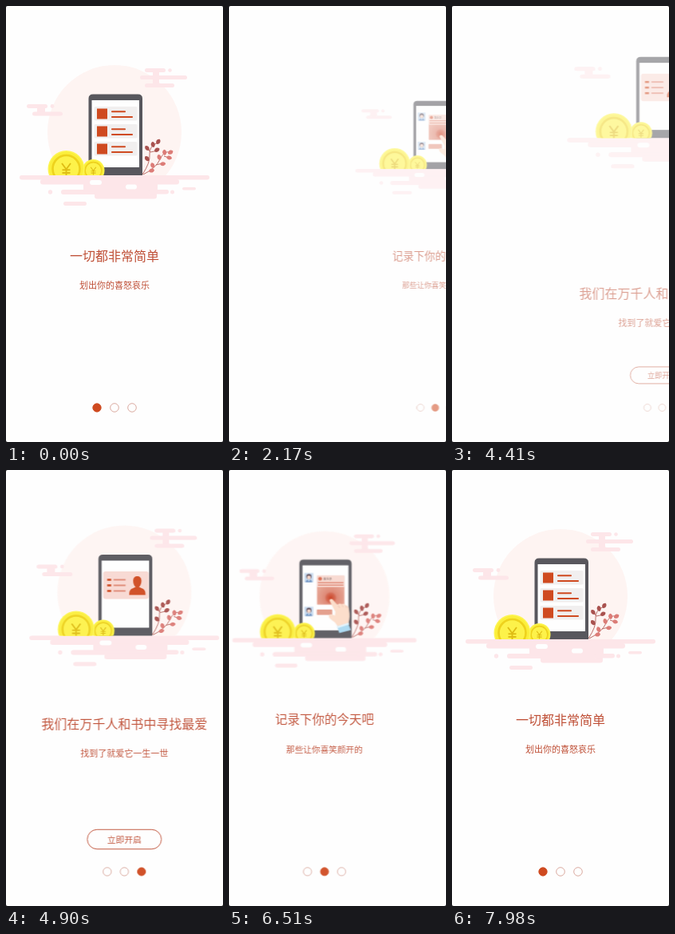
Recreate the animation shown at these times as an HTML page. Size 272 by 546 pixels, loop 8000 ms.

```html
<!DOCTYPE html>
<html lang="zh-CN">
<head>
<meta charset="utf-8">
<title>引导页</title>
<style>
@property --x { syntax: "<number>"; inherits: true; initial-value: 0; }

html, body { margin: 0; width: 100%; height: 100%; overflow: hidden; background: #222; }
svg {
  display: block; width: 100%; height: 100%;
  background: #fefefe; border-radius: 2px;
  --red: #cf4a20; --ink: #bf4f36; --pink: #fde6e9;
  animation: swipe 8s infinite;
}
text { font-family: "Noto Sans CJK SC", "Noto Sans CJK", "Noto Sans", sans-serif; text-anchor: middle; fill: var(--ink); }
.title { font-size: 16px; }
.sub { font-size: 11px; }

/* --x is the scroll position in pages; only the nearest page shows */
.page {
  --d: calc(var(--i) - var(--x));
  --p: max(var(--d), -1 * var(--d));
  --s: max(.84, 1 - .5 * var(--p));
  transform: translateX(calc(var(--d) * 272px));
  opacity: calc((1 - var(--p)) * clamp(0, (.5 - var(--p)) * 9999, 1));
}
.zoom { transform: scale(var(--s)); }
.up { transform: translateY(calc(var(--p) * -100px)); }
.down { transform: translateY(calc(var(--p) * 100px)); }
.halo { opacity: calc(1 - 2.3 * var(--p)); }
.art { transform-origin: 136px 162px; }
.title { transform-origin: 136px 313px; }
.sub { transform-origin: 136px 350px; }
.button { transform-origin: 136px 462px; }
.dots { transform-origin: 136px 503px; }

.dots circle { fill: none; stroke: #d7a297; stroke-width: .9; }
.dots .on { fill: var(--red); stroke: var(--red); }

@keyframes swipe {
  0%, 19.25% { --x: 0; animation-timing-function: cubic-bezier(.447, 0, .447, 1); }
  35.5%, 47.25% { --x: 1; animation-timing-function: cubic-bezier(.413, 0, .413, 1); }
  64.75%, 75.25% { --x: 2; animation-timing-function: cubic-bezier(.225, 0, .225, 1); }
  84%, 88.4% { --x: 1; animation-timing-function: cubic-bezier(.25, 0, .25, 1); }
  98.5%, 100% { --x: 0; }
}
</style>
</head>
<body>
<svg viewBox="0 0 272 546" preserveAspectRatio="none">
  <defs>
    <radialGradient id="press" gradientUnits="userSpaceOnUse" cx="144" cy="160" r="19">
      <stop offset="0" stop-color="#c93a1c"/>
      <stop offset=".3" stop-color="#d4624a"/>
      <stop offset=".42" stop-color="#dd8470"/>
      <stop offset="1" stop-color="#e6a08e"/>
    </radialGradient>
    <clipPath id="above"><rect width="272" height="212"/></clipPath>

    <g id="coin">
      <circle r="23" fill="#fdf553"/>
      <circle r="21.5" fill="#fbee3a"/>
      <circle r="17" fill="#fdf24a" stroke="#eed21d" stroke-width="2.6"/>
      <path d="M-5.5-7 0 .5 5.5-7M0 .5V9M-5 1.2H5M-5 5H5" fill="none" stroke="#dfbd14" stroke-width="1.9"/>
    </g>

    <path id="leaf" d="M0 0C-3.400-1.500-3.300-6 0-7.200C3.300-6 3.400-1.500 0 0Z"/>

    <g id="scene">
      <circle class="halo" cx="136" cy="158" r="84" fill="#fef4f2" clip-path="url(#above)"/>
      <g fill="var(--pink)">
        <rect x="174" y="78" width="26" height="5" rx="2.500"/>
        <circle cx="205.500" cy="80.500" r="2.300"/>
        <rect x="184" y="82" width="8" height="6"/>
        <rect x="168" y="87" width="59" height="5" rx="2.500"/>
        <rect x="184" y="91" width="8" height="7"/>
        <rect x="174" y="97" width="37" height="5" rx="2.500"/>

        <rect x="26" y="123" width="26" height="5" rx="2.500"/>
        <circle cx="58" cy="125.500" r="2.400"/>
        <rect x="39" y="127" width="10" height="7"/>
        <rect x="33" y="132.500" width="38" height="5" rx="2.500"/>

        <rect x="17" y="212" width="238" height="5.500" rx="2.700"/>
        <rect x="43" y="217" width="174" height="6.500" rx="3"/>
        <rect x="97" y="222" width="93" height="9"/>
        <rect x="69" y="230" width="121" height="6" rx="3"/>
        <rect x="111" y="234" width="78" height="7.500" rx="3"/>
        <rect x="72" y="245" width="29" height="5" rx="2.500"/>
        <rect x="221" y="227" width="17" height="3.500" rx="1.700"/>
        <rect x="178" y="230" width="26" height="5.500" rx="2.700"/>
        <circle cx="55.500" cy="233" r="2.700"/>
        <circle cx="208.500" cy="233" r="2.500"/>
      </g>
      <g fill="#fefefe">
        <rect x="105" y="218" width="15" height="6" rx="3"/>
        <rect x="150" y="223.500" width="14" height="6" rx="3"/>
      </g>

      <g fill="none" stroke="#b3605b" stroke-width=".9">
        <path d="M171 211Q181 196 180 186T190 171"/>
        <path d="M172 211Q188 203 193 192T206 183"/>
        <path d="M181 183 178 179M181 183 190 181M180 193 176 189M193 192 192 187M188 199 196 197M198 188 204 190"/>
      </g>
      <g fill="#a9524f">
        <use href="#leaf" transform="translate(189 173) rotate(30)"/>
        <use href="#leaf" transform="translate(185 177) rotate(-12)"/>
        <use href="#leaf" transform="translate(179 181) rotate(-35)"/>
        <use href="#leaf" transform="translate(186 182) rotate(62)"/>
        <use href="#leaf" transform="translate(179 194) rotate(-38)"/>
      </g>
      <g fill="#dc7c77">
        <use href="#leaf" transform="translate(203 185) rotate(60)"/>
        <use href="#leaf" transform="translate(199 187) rotate(-5)"/>
        <use href="#leaf" transform="translate(201 189) rotate(105)"/>
        <use href="#leaf" transform="translate(193 193) rotate(-15)"/>
        <use href="#leaf" transform="translate(193 198) rotate(85)"/>
        <use href="#leaf" transform="translate(185 203) rotate(-20)"/>
        <use href="#leaf" transform="translate(179 207) rotate(75)"/>
      </g>

      <path d="M103.500 212V116Q103.500 110.500 109 110.500H165.500Q171 110.500 171 116V212Z" fill="#58575d"/>
      <rect x="107.500" y="118" width="59.500" height="84" fill="#fefefe"/>
      <g clip-path="url(#above)">
        <use href="#coin" transform="translate(109.500 206) scale(.61)"/>
        <use href="#coin" transform="translate(75.500 204)"/>
      </g>
    </g>

    <g id="row">
      <rect x="110.500" y="126" width="54" height="17.500" rx="1.500" fill="#f1efef"/>
      <rect x="114" y="128.500" width="13" height="13" fill="var(--red)"/>
      <path d="M133 132.300H149M133 139H158" stroke="var(--red)" stroke-width="2.100" stroke-linecap="round"/>
    </g>

    <g id="face">
      <rect x="110" y="128" width="11.500" height="12" fill="#c6daef"/>
      <circle cx="115.800" cy="132.500" r="3.300" fill="#5b4a57"/>
      <circle cx="115.800" cy="133.700" r="2.400" fill="#f6d5c6"/>
      <path d="M111.500 140Q112 136.500 115.800 136.500T120 140Z" fill="#6d93c4"/>
      <path d="M114.800 136.600H116.800L115.800 139Z" fill="#fff"/>
    </g>

    <g id="line">
      <path d="M114.500 142H119.500" stroke="var(--red)" stroke-width="2.600"/>
      <path d="M122.500 142H137.500" stroke="#e08b78" stroke-width="2"/>
    </g>
  </defs>

  <g class="page" style="--i:0">
    <g class="art up">
      <use href="#scene"/>
      <use href="#row"/>
      <use href="#row" y="22"/>
      <use href="#row" y="44"/>
    </g>
    <text class="title down" x="136" y="319">一切都非常简单</text>
    <text class="sub down" x="136" y="354.200">划出你的喜怒哀乐</text>
    <g class="dots zoom">
      <circle class="on" cx="114" cy="503" r="5.200"/>
      <circle cx="136" cy="503" r="5.300"/>
      <circle cx="158" cy="503" r="5.300"/>
    </g>
  </g>

  <g class="page" style="--i:1">
    <g class="art zoom">
      <use href="#scene"/>
      <use href="#face"/>
      <use href="#face" y="43.500"/>
      <rect x="126" y="131" width="36" height="38" rx="1.500" fill="#f8d8cf"/>
      <circle cx="130.300" cy="135.300" r="2.400" fill="#d9664a"/>
      <text x="140" y="136.600" style="font-size:3.600px;fill:#6b5452">备忘录</text>
      <path d="M127.500 140.300H160.500M127.500 143.500H160.500" stroke="#dc7a64" stroke-width="1.200"/>
      <rect x="126.500" y="146" width="35" height="22.500" fill="url(#press)"/>
      <rect x="126" y="175" width="20" height="7" rx="1" fill="#e39a87"/>
      <path d="M152 196 166 191.500 170 201.500 155 205.500Z" fill="#a9d9f2"/>
      <path d="M151.500 195 166.500 190.500 168 194.500 153 199Z" fill="#e3f3fb"/>
      <path d="M142.300 163.500Q143.500 160 146.800 162.300L153 169.500Q155 166 158 168.300Q161 166.500 163.500 169.500Q167.500 170 167.800 176Q169.500 185 167 192L153 196.500Q150 191 144.500 188Q140.500 184.500 142 182Q144.500 180 149.500 183L150 178Z" fill="#fcdcc8"/>
      <path d="M153.500 169.500 155.500 173M158.500 168.500 160 172M163.500 169.800 164.500 173" fill="none" stroke="#eebfac" stroke-width=".7"/>
    </g>
    <text class="title zoom" x="136" y="318.600">记录下你的今天吧</text>
    <text class="sub zoom" x="136" y="354">那些让你喜笑颜开的</text>
    <g class="dots zoom">
      <circle cx="114" cy="503" r="5.300"/>
      <circle class="on" cx="136" cy="503" r="5.200"/>
      <circle cx="158" cy="503" r="5.300"/>
    </g>
  </g>

  <g class="page" style="--i:2">
    <g class="art up">
      <use href="#scene"/>
      <rect x="109.500" y="131.500" width="57" height="34.500" rx="3" fill="#f8d9d2"/>
      <use href="#line"/>
      <use href="#line" y="7"/>
      <use href="#line" y="14"/>
      <path d="M142 161Q141.500 154 147 152.500L150 151Q147 148 147 143Q147.300 137.500 152.200 137.500T157.400 143Q157.400 148 154.400 151L157.500 152.500Q163 154 162.500 161Z" fill="var(--red)"/>
    </g>
    <text class="title down" x="136" y="319">我们在万千人和书中寻找最爱</text>
    <text class="sub down" x="136" y="354.200">找到了就爱它一生一世</text>
    <g class="button zoom">
      <rect x="88.500" y="450" width="95" height="25" rx="12.500" fill="none" stroke="var(--ink)"/>
      <text x="136" y="466.700" font-size="11">立即开启</text>
    </g>
    <g class="dots zoom">
      <circle cx="114" cy="503" r="5.300"/>
      <circle cx="136" cy="503" r="5.300"/>
      <circle class="on" cx="158" cy="503" r="5.200"/>
    </g>
  </g>
</svg>
</body>
</html>
```
